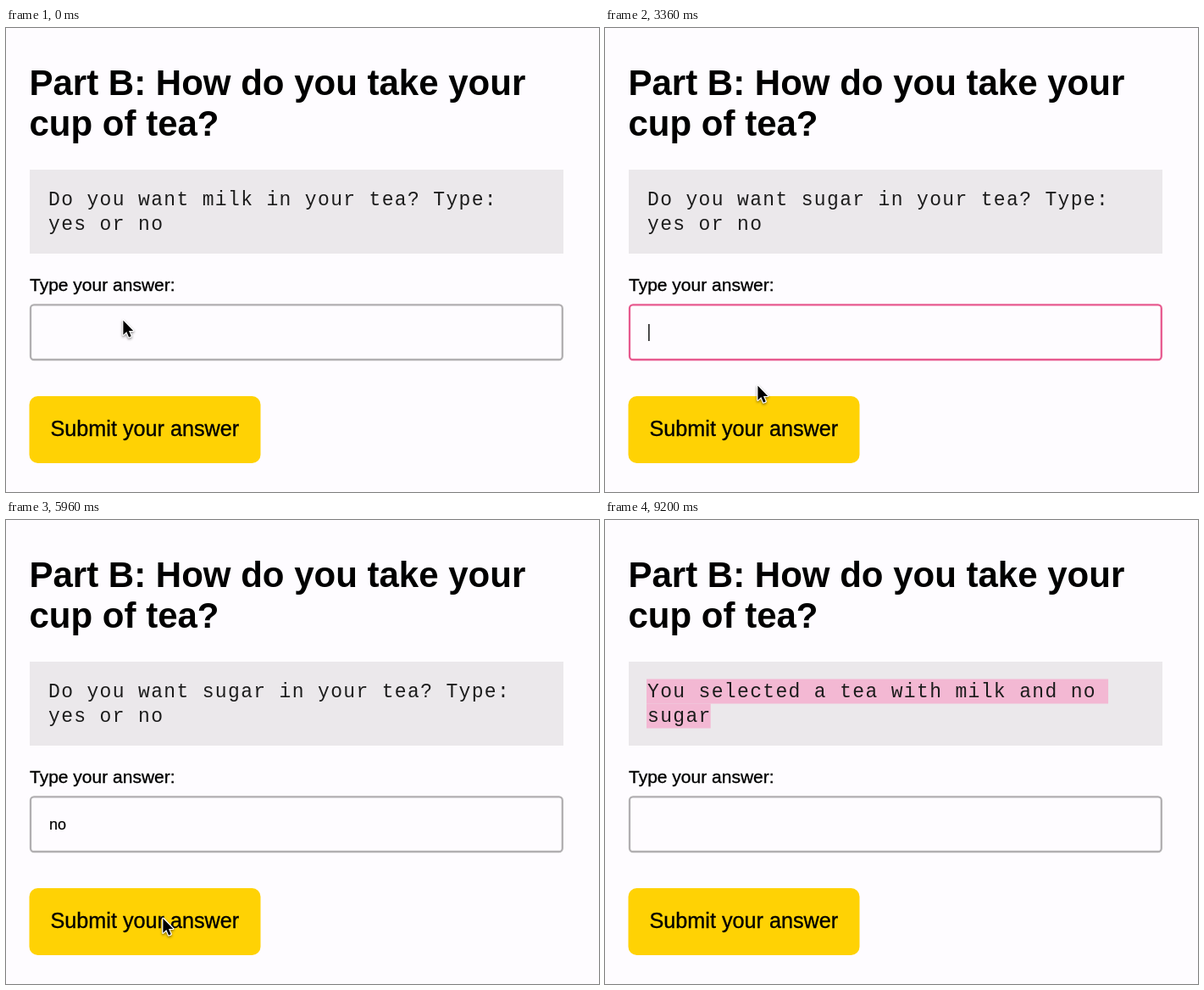
These frames come from a looping animation (700x547 px, 9360 ms). An HTML page with a canvas:

```html
<!DOCTYPE html>
<html lang="en">
<head>
<meta charset="utf-8">
<title>Cup of tea</title>
<style>
html, body { margin: 0; width: 100%; height: 100%; overflow: hidden; background: #fefcff; }
canvas { display: block; width: 700px; height: 547px; }
</style>
</head>
<body>
<canvas id="stage"></canvas>
<script>
const W = 700, H = 547, LOOP = 9360, STEP = 40;
const BLINK = 560, KEY = 120, PRESS = 120, WAKE = 520;
const DRAG_START = 7320, DRAG_END = 7640;
const PAPER = '#fefcff', INK = '#000', PINK = '#f3b8d3';
const SANS = '"Liberation Sans", Arial, sans-serif';
const MONO = '"Liberation Mono", "Courier New", monospace';
const UI = 'Inter, Roboto, sans-serif';
const PITCH = 15.14, LINE = 29;

const canvas = document.getElementById('stage');
const ctx = canvas.getContext('2d');
const dpr = window.devicePixelRatio || 1;
canvas.width = W * dpr;
canvas.height = H * dpr;

// Times at which the field is clicked, typing starts and the button is pressed.
const ask = what => [`Do you want ${what} in your tea? Type:`, 'yes or no'];
const rounds = [
  { lines: ask('milk'), word: 'yes', open: 760, type: 2040, press: 2960 },
  { lines: ask('sugar'), word: 'no', open: 3960, type: 4960, press: 5960 }
];
const result = { lines: ['You selected a tea with milk and no', 'sugar'], word: '' };
const history = ['a', 'asfasf', 'yes'];

const soft = u => u * u * (3 - 2 * u);
const linear = u => u;
const speedUp = u => u * u;
const clamp = (v, lo, hi) => Math.min(hi, Math.max(lo, v));

// Pointer moves; it rests between them.
const moves = [
  { from: 300, to: 520, x: 136, y: 345 },
  { from: 2560, to: 2880, x: 178, y: 465 },
  { from: 3160, to: 3360, x: 180, y: 422, ease: speedUp },
  { from: 3360, to: 3800, x: 146, y: 362 },
  { from: 5480, to: 5800, x: 185, y: 470 },
  { from: 6480, to: 6600, x: 322, y: 491, ease: speedUp },
  { from: 6600, to: 6720, x: 720, y: 560, ease: linear },
  { from: 6960, to: 7240, x: 50, y: 202 },
  { from: DRAG_START, to: DRAG_END, x: 133, y: 231 },
  { from: 7880, to: 8400, x: 720, y: 315, ease: speedUp }
];

function pointerAt(t) {
  let x = 138, y = 345;
  for (const m of moves) {
    const u = (m.ease || soft)(clamp((t - m.from) / (m.to - m.from), 0, 1));
    x += (m.x - x) * u;
    y += (m.y - y) * u;
  }
  return [x, y];
}

function stateAt(t) {
  const done = rounds.filter(r => t >= r.press + PRESS);
  const round = rounds[done.length] || result;
  const keys = t >= round.type ? Math.floor((t - round.type) / KEY) + 1 : 0;
  const value = round.word.slice(0, keys);
  const pressed = t >= round.press;
  const active = t >= rounds[0].open && t < DRAG_START && !pressed;
  const menu = t >= round.open
    ? history.filter(h => h.startsWith(value) && h !== value) : [];
  const resets = [...done.map(r => r.press + PRESS), round.open,
    round.type + KEY * (value.length - 1)].filter(s => s <= t);
  const caret = active && Math.floor((t - Math.max(...resets)) / BLINK) % 2 === 0;
  const hidden = t >= round.type && t < round.type + WAKE;
  return { lines: round.lines, value, active, menu, caret, hidden };
}

// A thin outline in the same colour gives the slightly heavier screen weight.
function text(str, x, y, font, color = INK, weight = 0) {
  ctx.font = font;
  ctx.fillStyle = ctx.strokeStyle = color;
  ctx.fillText(str, x, y);
  if (!weight) return;
  ctx.lineWidth = weight;
  ctx.strokeText(str, x, y);
}

function rect(x, y, w, h, color) {
  ctx.fillStyle = color;
  ctx.fillRect(x, y, w, h);
}

function rounded(x, y, w, h, r, color) {
  ctx.beginPath();
  ctx.roundRect(x, y, w, h, r);
  ctx.fillStyle = color;
  ctx.fill();
}

function shadow(color, blur, dy) {
  ctx.shadowColor = color;
  ctx.shadowBlur = blur * dpr;
  ctx.shadowOffsetY = dy * dpr;
}

function drawSelection(t, lines) {
  if (t < DRAG_START) return;
  const [x, y] = pointerAt(Math.min(t, DRAG_END));
  const row = y < 187 + LINE ? 0 : 1;
  for (let i = 0; i <= row; i++) {
    const full = PITCH * (lines[i].length + (i ? 0 : 1));
    rect(49, 187.5 + LINE * i, i < row ? full : clamp(x - 49, 0, full), LINE, PINK);
  }
}

function drawQuestion(t, lines) {
  rect(28, 167, 630, 99, '#ebe8eb');
  drawSelection(t, lines);
  ctx.letterSpacing = '1.34px';
  lines.forEach((line, i) => text(line, 50, 209 + LINE * i, '23px ' + MONO, '#1c1c1c'));
  ctx.letterSpacing = '0px';
}

function drawInput({ value, active, caret }) {
  rounded(29, 326.4, 627.8, 64.6, 4, PAPER);
  ctx.lineWidth = 2.3;
  ctx.strokeStyle = active ? '#e75a8f' : '#b1afb1';
  ctx.stroke();
  text(value, 51, 365, '18px ' + SANS, INK, 0.2);
  if (caret) rect(51.2 + ctx.measureText(value).width, 349, 1.4, 20, INK);
}

function drawMenu(items) {
  if (!items.length) return;
  ctx.save();
  shadow('rgba(0,0,0,.38)', 5, 1);
  rect(27, 394, 253, 24 + 47.3 * items.length, PAPER);
  ctx.restore();
  items.forEach((item, i) => text(item, 41, 434 + 47.3 * i, '500 17px ' + UI, '#38383a', 0.2));
}

function drawArrow() {
  ctx.beginPath();
  ctx.moveTo(0, 0);
  ctx.lineTo(0, 17);
  ctx.lineTo(3.9, 13.4);
  ctx.lineTo(6.7, 19.8);
  ctx.lineTo(9.3, 18.6);
  ctx.lineTo(6.6, 12.4);
  ctx.lineTo(11.8, 12.2);
  ctx.closePath();
  ctx.lineJoin = 'round';
  ctx.lineWidth = 2.4;
  ctx.strokeStyle = '#fff';
  shadow('rgba(0,0,0,.45)', 3, 1.5);
  ctx.stroke();
  shadow('transparent', 0, 0);
  ctx.fillStyle = INK;
  ctx.fill();
}

function drawBeam() {
  ctx.beginPath();
  for (const s of [-1, 1]) {
    ctx.moveTo(-4.5, 9.5 * s);
    ctx.quadraticCurveTo(-0.5, 9.5 * s, 0, 7 * s);
    ctx.quadraticCurveTo(0.5, 9.5 * s, 4.5, 9.5 * s);
  }
  ctx.moveTo(0, -7.5);
  ctx.lineTo(0, 7.5);
  ctx.moveTo(-2, 3);
  ctx.lineTo(2, 3);
  for (const [w, color] of [[3.4, '#fff'], [1.5, INK]]) {
    ctx.lineWidth = w;
    ctx.strokeStyle = color;
    ctx.stroke();
  }
}

function overText(x, y, lines) {
  if (x > 28 && x < 658 && y > 325 && y < 392) return true;
  const line = lines[Math.floor((y - 187) / LINE)];
  return !!line && x >= 49 && x < 49 + PITCH * line.length;
}

function drawPointer(t, { lines, hidden }) {
  if (hidden) return;
  const [x, y] = pointerAt(t);
  ctx.save();
  ctx.translate(x + 0.4, y - 0.3);
  // The shape only updates once the pointer has moved.
  if (t > moves[0].from && overText(x, y, lines)) drawBeam();
  else drawArrow();
  ctx.restore();
}

function draw(t) {
  const state = stateAt(t);
  ctx.setTransform(dpr, 0, 0, dpr, 0, 0);
  rect(0, 0, W, H, PAPER);
  text('Part B: How do you take your', 27.5, 79, 'bold 42px ' + SANS);
  text('cup of tea?', 27.5, 127.4, 'bold 42px ' + SANS);
  drawQuestion(t, state.lines);
  text('Type your answer:', 28, 309.5, '21px ' + SANS, INK, 0.35);
  drawInput(state);
  rounded(27.5, 434, 273, 79, 10, '#ffd204');
  text('Submit your answer', 52.5, 481, '25.2px ' + SANS, INK, 0.35);
  drawMenu(state.menu);
  drawPointer(t, state);
}

const begin = performance.now();
function tick() {
  const t = (performance.now() - begin) % LOOP;
  draw(Math.floor(t / STEP) * STEP);
  requestAnimationFrame(tick);
}
tick();
</script>
</body>
</html>
```
